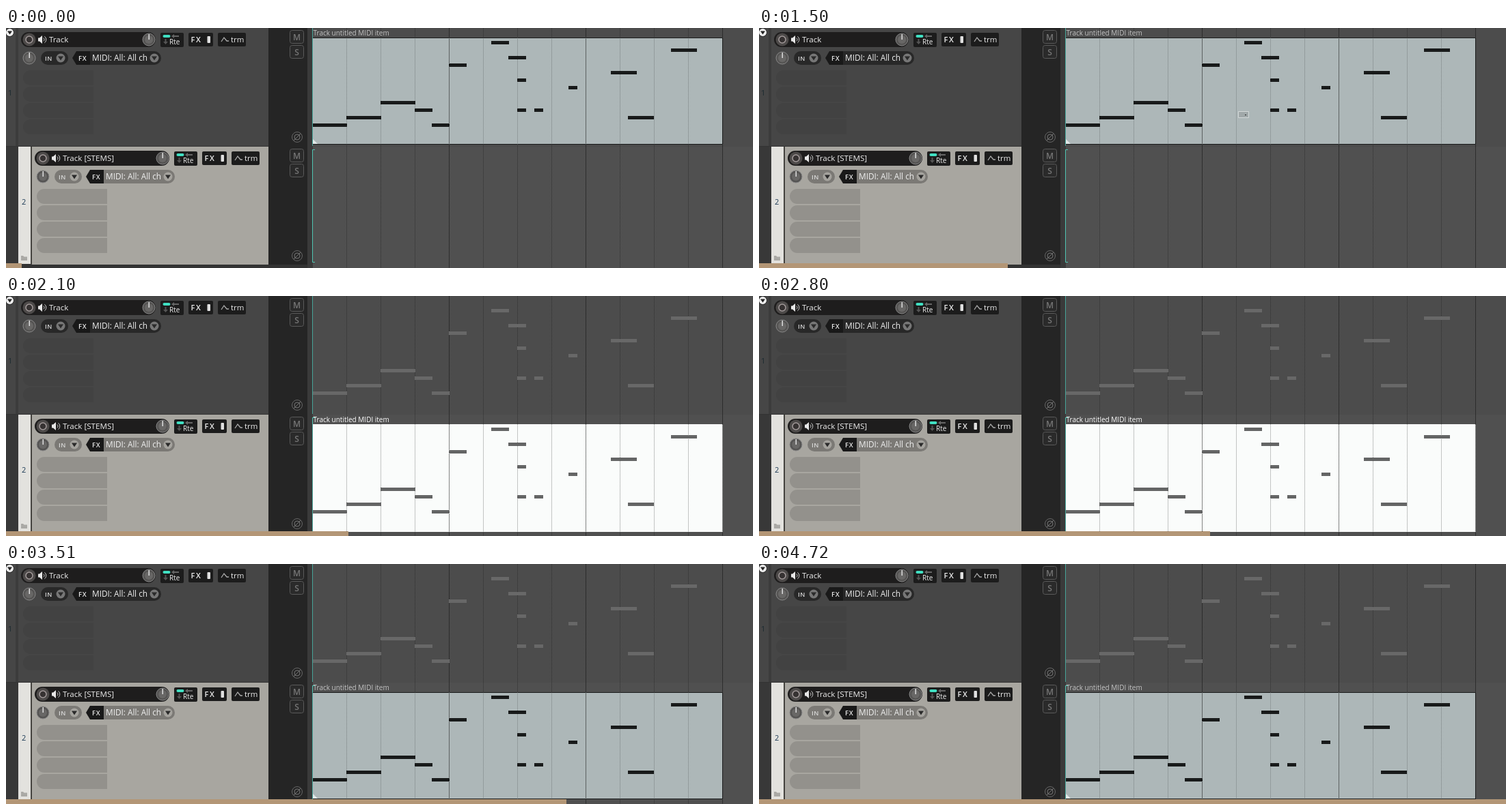
These frames come from a looping animation (1093 by 352 pixels, 8220 ms). An HTML page with a canvas:

```html
<!DOCTYPE html>
<html>
<head>
<meta charset="utf-8">
<style>
html, body { margin: 0; width: 100%; height: 100%; overflow: hidden; background: #333; }
canvas { display: block; }
</style>
</head>
<body>
<canvas width="1093" height="352"></canvas>
<script>
const ctx = document.querySelector('canvas').getContext('2d');
const LOOP = 8220, STEPS = 48, STEP_MS = 100.4;
const ROW = 174, LEFT = 448, BEAT = 50;
const PRESS = 14, SELECT = 16, MOVE = 21, DESELECT = 35;

// Each phrase repeats one note length at a fixed gap, in quarter beats
const PHRASES = [
  { start: 0, gap: 4, length: 4, rows: [11, 10, 8] },
  { start: 12, gap: 2, length: 2, rows: [9, 11, 3] },
  { start: 21, gap: 2, length: 2, rows: [0, 2] },
  { start: 24, gap: 0, length: 1, rows: [5, 9] },
  { start: 26, gap: 4, length: 1, rows: [9, 6] },
  { start: 35, gap: 2, length: 3, rows: [4, 10] },
  { start: 42, gap: 0, length: 3, rows: [1] }
];

function paint(fill, stroke, width = 1) {
  if (fill) { ctx.fillStyle = fill; ctx.fill(); }
  if (stroke) { ctx.strokeStyle = stroke; ctx.lineWidth = width; ctx.stroke(); }
}

function box(x, y, w, h, color) {
  ctx.fillStyle = color;
  ctx.fillRect(x, y, w, h);
}

function round(x, y, w, h, r, fill, stroke) {
  ctx.beginPath();
  ctx.roundRect(x, y, w, h, r);
  paint(fill, stroke);
}

function circle(x, y, r, fill, stroke, width) {
  ctx.beginPath();
  ctx.arc(x, y, r, 0, Math.PI * 2);
  paint(fill, stroke, width);
}

function shape(d, fill, stroke, width = 1) {
  const p = new Path2D(d);
  if (fill) { ctx.fillStyle = fill; ctx.fill(p); }
  if (stroke) { ctx.strokeStyle = stroke; ctx.lineWidth = width; ctx.stroke(p); }
}

function text(str, x, y, size, color, weight = 400, spacing = 0) {
  ctx.font = `${weight} ${size}px "Open Sans", "Noto Sans", sans-serif`;
  ctx.letterSpacing = spacing + 'px';
  ctx.fillStyle = color;
  ctx.fillText(str, x, y);
}

function dropdown(x, y, fill) {
  circle(x, y, 6.5, fill);
  shape(`M${x - 4} ${y - 2.5}h8l-4 6z`, '#2a2a2a');
}

function knob(x, y) {
  circle(x, y, 9, '#555453', '#888');
  circle(x, y, 6, '#686766');
  box(x - 0.5, y - 8, 1.5, 8, '#ddd');
}

function speaker() {
  shape('M47 14.5h2l4-3.5v12l-4-3.5h-2z', '#e8e8e8');
  for (const r of [3, 5.8]) {
    ctx.beginPath();
    ctx.arc(53, 17, r, -0.95, 0.95);
    paint(null, '#ccc');
  }
}

function controls(dx, dy, name, pill, drop) {
  ctx.save();
  ctx.translate(dx, dy);
  round(22, 6, 197, 22, 11, '#1e1d1d');
  circle(34, 17, 9.5, '#4d4a49');
  circle(34, 17, 5, '#363232', '#a39b9b', 1.5);
  speaker();
  text(name, 63, 21, 11.6, '#eee');
  knob(209, 17);

  round(226, 7, 34, 21, 2, '#1c1c1c');
  round(229.5, 10, 11, 4, 2, '#40e0c2');
  shape('M253 11v2h-7v2l-4-3 4-3v2z', '#666');
  shape('M232.5 16h2v4h2.5l-3.5 4-3.5-4h2.5z', '#555');
  text('Rte', 239, 24, 10, '#eee');

  round(267, 7, 36, 20, 2, '#1c1c1c');
  text('FX', 270.5, 21, 11, '#eee', 600, 1.6);
  round(294.5, 12, 4.5, 10, 1, '#e0e0e0');

  round(310, 7, 41, 20, 2, '#1c1c1c');
  shape('M315 20l4-6 4 5h3', null, '#aaa', 1.3);
  text('trm', 329, 20.5, 11.4, '#eee');

  knob(34, 44);
  round(51, 34, 40, 20, 10, pill);
  text('IN', 57, 47.5, 9, '#ddd', 600, 0.6);
  dropdown(80, 44, drop);
  round(112, 34, 115, 20, [0, 10, 10, 0], pill);
  shape('M97 44l6-10h20v20h-20z', '#191919');
  text('FX', 106, 47.5, 9.5, '#e8e8e8', 600, 0.8);
  ctx.save();
  ctx.beginPath();
  ctx.rect(123, 34, 84, 20);
  ctx.clip();
  text('MIDI: All: All ch', 126, 48, 11.8, '#f0f0f0');
  ctx.restore();
  dropdown(217, 44, drop);
  ctx.restore();
}

function slots(x, y, color) {
  for (let i = 0; i < 4; i++) round(x, y + i * 24, 103, 22, [11, 0, 0, 11], color);
}

function sideButtons(y) {
  ctx.textAlign = 'center';
  ['M', 'S'].forEach((label, i) => {
    round(415.5, y + 3.5 + i * 22, 20, 19, 3, '#2a2a2a', '#5a5a5a');
    text(label, 425.5, y + 17.5 + i * 22, 12, '#777', 600);
  });
  ctx.textAlign = 'left';
  circle(426, y + 160, 7.5, null, '#666');
  circle(426, y + 160, 4, null, '#777');
  shape(`M421 ${y + 165}l10-10`, null, '#777');
}

function panels() {
  box(0, 0, 1093, 352, '#333');
  box(0, 0, 384, 173, '#464646');
  box(14, 0, 4, 173, '#3c3c3c');
  box(0, 174, 18, 173, '#383838');
  box(18, 174, 18, 172, '#e3e2de');
  box(36, 174, 2, 173, '#44433f');
  box(38, 174, 346, 173, '#a8a6a0');
  box(384, 0, 57, 347, '#252525');
  box(441, 0, 8, 352, '#3a3a3a');

  circle(5.5, 6.5, 6, '#eee', '#222');
  shape('M2 4.5h7l-3.5 5z', '#222');
  text('1', 3, 99, 11, '#1c2a30');
  text('2', 23, 259, 11, '#1c3a55');
  shape('M22 334h3l1.5 1.5h4.5v5.5h-9z', '#aaa9a5');

  slots(25, 62, '#424242');
  slots(45, 236, '#93918c');
  controls(0, 0, 'Track', '#282828', '#777');
  controls(20, ROW, 'Track [STEMS]', '#7b7975', '#a5a39e');
  sideButtons(0);
  sideButtons(ROW);
}

function grid(y, h, weak) {
  ctx.setLineDash([1, 1]);
  for (let i = 1; i <= 12; i++) {
    shape(`M${LEFT + 0.5 + i * BEAT} ${y}v${h}`, null, i % 4 ? weak : '#0c0c0c');
  }
  ctx.setLineDash([]);
}

function lanes() {
  box(449, 0, 644, ROW, '#4c4c4c');
  box(449, ROW, 644, 178, '#505050');
  grid(0, 352, '#303030');
}

function notes(dy, color) {
  for (const { start, gap, length, rows } of PHRASES) {
    rows.forEach((row, i) => {
      const x = Math.floor(LEFT + (start + i * gap) * BEAT / 4);
      box(x, 19 + row * 11 + dy, Math.ceil(length * BEAT / 4 + 0.5), 5, color);
    });
  }
}

function item(dy, selected) {
  const top = 14 + dy;
  box(LEFT, top, 601, selected ? 158 : 157, selected ? '#fafcfb' : '#adb7b8');
  grid(top, 157, selected ? '#8c8e8d' : '#798182');
  if (!selected) {
    round(LEFT + 0.5, top + 0.5, 600, 156, 0, null, '#191b1b');
    shape(`M449 ${top + 149}l7 7h-7z`, '#e2e8e8');
  }
  notes(dy, selected ? '#646565' : '#181a1a');
  text('Track untitled MIDI item', 449.5, 11 + dy, 10, selected ? '#fff' : '#c4c4c4');
}

function editCursor() {
  box(LEFT, 0, 1, 173, '#46a498');
  shape('M452 178.5h-3.5v165h3.5', null, '#4fc4b2');
}

function pointer(step) {
  if (step >= PRESS && step < SELECT) {
    const drag = step - PRESS + 2;
    round(701.5, 122.5, drag * 5, drag * 3, 0, '#a0a8a9', '#d5dada');
    box(711, 127, 2, 1, '#222');
  }
  if (step >= SELECT && step < MOVE) {
    shape('M718.5 133v17l3.8-3.5 2.7 6 2.6-1.2-2.6-5.8 5-.3z', '#fff', '#111');
  }
}

function draw(t) {
  const step = Math.min(STEPS - 1, Math.floor((t + 18) / STEP_MS));
  const moved = step >= MOVE;
  panels();
  lanes();
  if (moved) notes(0, '#686868');
  editCursor();
  item(moved ? ROW : 0, step >= SELECT && step < DESELECT);
  box(LEFT, moved ? ROW + 14 : 14, 1, 157, '#46a498');
  pointer(step);
  box(0, 345, Math.round((step + 1) * 1093 / STEPS), 7, '#b39676');
}

let begin;
function tick(now) {
  begin ??= now;
  draw((now - begin) % LOOP);
  requestAnimationFrame(tick);
}
requestAnimationFrame(tick);
</script>
</body>
</html>
```
